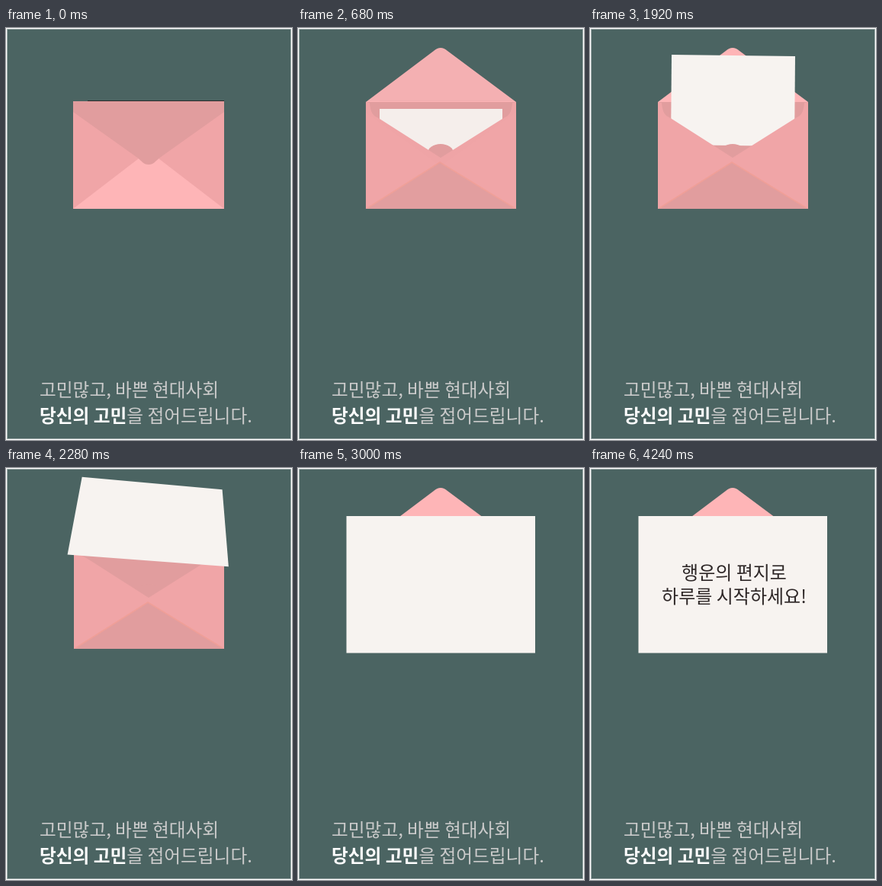
An HTML page with a canvas that plays this animation: 375x540 px, repeating every 5.32 s.

```html
<!DOCTYPE html>
<html lang="ko">
<head>
<meta charset="utf-8">
<title>행운의 편지</title>
<style>
html, body { margin: 0; width: 100%; height: 100%; overflow: hidden; background: #4b6462; }
canvas { display: block; width: 375px; height: 540px; }
</style>
</head>
<body>
<canvas id="stage" width="375" height="540"></canvas>
<script>
const W = 375, H = 540, LOOP = 5320, STEP = 40;
const FONT = '"Noto Sans CJK KR", "Noto Sans CJK", sans-serif';
const C = {
  bg: '#4b6462', deep: '#e19d9e', side: '#f0a5a7', light: '#feb5b7',
  seam: '#f09f98', paper: '#f7f3f0', ink: '#2d2626', grey: '#cbcbcb'
};
const stage = document.getElementById('stage').getContext('2d');

function makeLayer(paint) {
  const layer = document.createElement('canvas');
  layer.width = W;
  layer.height = H;
  const g = layer.getContext('2d');
  g.fillStyle = C.bg;
  g.fillRect(0, 0, W, H);
  paint(g);
  return layer;
}

function poly(g, color, pts) {
  g.fillStyle = color;
  g.beginPath();
  pts.forEach(([x, y]) => g.lineTo(x, y));
  g.closePath();
  g.fill();
}

function path(g, color, d) {
  g.fillStyle = color;
  g.fill(new Path2D(d));
}

function label(g, text, x, y, size, weight, color) {
  g.font = `${weight} ${size}px ${FONT}`;
  g.fillStyle = color;
  g.fillText(text, x, y);
  return x + g.measureText(text).width;
}

const closed = makeLayer(g => {
  g.fillStyle = C.side;
  g.fillRect(88, 96, 198, 141);
  poly(g, C.light, [[88, 237], [187, 161], [286, 237]]);
  path(g, C.deep, 'M88 96H286V110L203 169C196 174 194 179 187 179S178 174 171 169L88 110Z');
  g.fillStyle = '#2c2b2c';
  g.fillRect(107, 95, 179, 1);
});

// Parts of the open envelope behind and in front of the letter
function openBack(g) {
  path(g, C.light, 'M89 97L178 30Q187 22 196 30L286 97Z');
  poly(g, C.deep, [[89, 97], [286, 97], [286, 110], [187, 178], [89, 110]]);
}

function openFront(g) {
  g.fillStyle = C.deep;
  g.beginPath();
  g.ellipse(187, 164, 17, 12, 0, 0, Math.PI * 2);
  g.fill();
  path(g, C.side, 'M89 97L94 98Q95 111 100 115L107 119L187 170L268 119L275 115Q280 111 281 98L286 97V237H89Z');
  poly(g, C.deep, [[89, 237], [186, 176], [286, 237]]);
  g.strokeStyle = C.seam;
  g.lineWidth = 1.5;
  g.beginPath();
  g.moveTo(91, 236);
  g.lineTo(186, 176);
  g.lineTo(284, 236);
  g.stroke();
}

const START = 1280, LIFT = 1920, FRONT = 2200;
const REST = [[107, 106], [268, 106], [268, 224], [107, 224]];

// Letter corners: top left, top right, bottom right, bottom left
const POSES = [
  [1920, [[107, 35], [269, 37], [268, 155], [106, 153]]],
  [2200, [[103, 4], [276, 18], [285, 119], [88, 106]]],
  [2400, [[94, 33], [296, 52], [300, 160], [70, 141]]],
  [2520, [[93, 43], [294, 61], [291, 193], [70, 174]]],
  [3000, [[63.5, 63], [311, 63], [311, 242.5], [63.5, 242.5]]]
];

const mix = (a, b, u) => a + (b - a) * u;
const mixQuad = (a, b, u) => a.map((p, i) => p.map((v, k) => mix(v, b[i][k], u)));
const clamp = v => Math.max(0, Math.min(1, v));

function slope(n, i, k) {
  if (n === POSES.length - 1) return 0;
  const a = POSES[Math.max(0, n - 1)], b = POSES[n + 1];
  return (b[1][i][k] - a[1][i][k]) / (b[0] - a[0]);
}

function letterAt(t) {
  if (t < LIFT) return mixQuad(REST, POSES[0][1], clamp((t - START) / (LIFT - START)));
  const last = POSES.length - 1;
  if (t >= POSES[last][0]) return POSES[last][1];
  let n = 0;
  while (t >= POSES[n + 1][0]) n++;
  const [t0, a] = POSES[n], [t1, b] = POSES[n + 1];
  const d = t1 - t0, u = (t - t0) / d, u2 = u * u, u3 = u2 * u;
  return a.map((p, i) => p.map((v, k) =>
    (2 * u3 - 3 * u2 + 1) * v + (u3 - 2 * u2 + u) * d * slope(n, i, k) +
    (3 * u2 - 2 * u3) * b[i][k] + (u3 - u2) * d * slope(n + 1, i, k)));
}

function drawOpen(g, t) {
  const letter = letterAt(t);
  openBack(g);
  if (t < FRONT) poly(g, C.paper, letter);
  openFront(g);
  if (t >= FRONT) poly(g, C.paper, letter);
}

const opened = makeLayer(g => drawOpen(g, 0));

function drawCaption(g) {
  label(g, '고민많고, 바쁜 현대사회', 44, 483, 23.7, 400, C.grey);
  const x = label(g, '당신의 고민', 44, 517, 23.7, 700, '#fff');
  label(g, '을 접어드립니다.', x, 517, 23.7, 400, C.grey);
}

function drawMessage(g, alpha) {
  g.globalAlpha = alpha;
  g.textAlign = 'center';
  label(g, '행운의 편지로', 189, 145.5, 24, 500, C.ink);
  label(g, '하루를 시작하세요!', 189, 176.5, 24, 500, C.ink);
  g.textAlign = 'left';
  g.globalAlpha = 1;
}

function drawBorder(g) {
  g.strokeStyle = '#fff';
  g.lineWidth = 1;
  g.strokeRect(0.5, 0.5, W - 1, H - 1);
  g.setLineDash([1, 1]);
  g.strokeRect(1.5, 1.5, W - 3, H - 3);
  g.setLineDash([]);
}

function draw(t) {
  const g = stage;
  if (t <= START) {
    g.drawImage(closed, 0, 0);
    g.globalAlpha = clamp(t / 720);
    g.drawImage(opened, 0, 0);
    g.globalAlpha = 1;
  } else {
    g.fillStyle = C.bg;
    g.fillRect(0, 0, W, H);
    drawOpen(g, t);
  }
  if (t > 3200) drawMessage(g, clamp((t - 3200) / 1040));
  drawCaption(g);
  drawBorder(g);
}

const begin = performance.now();
function tick() {
  const t = (performance.now() - begin) % LOOP;
  draw(Math.floor(t / STEP) * STEP);
  requestAnimationFrame(tick);
}
tick();
</script>
</body>
</html>
```
